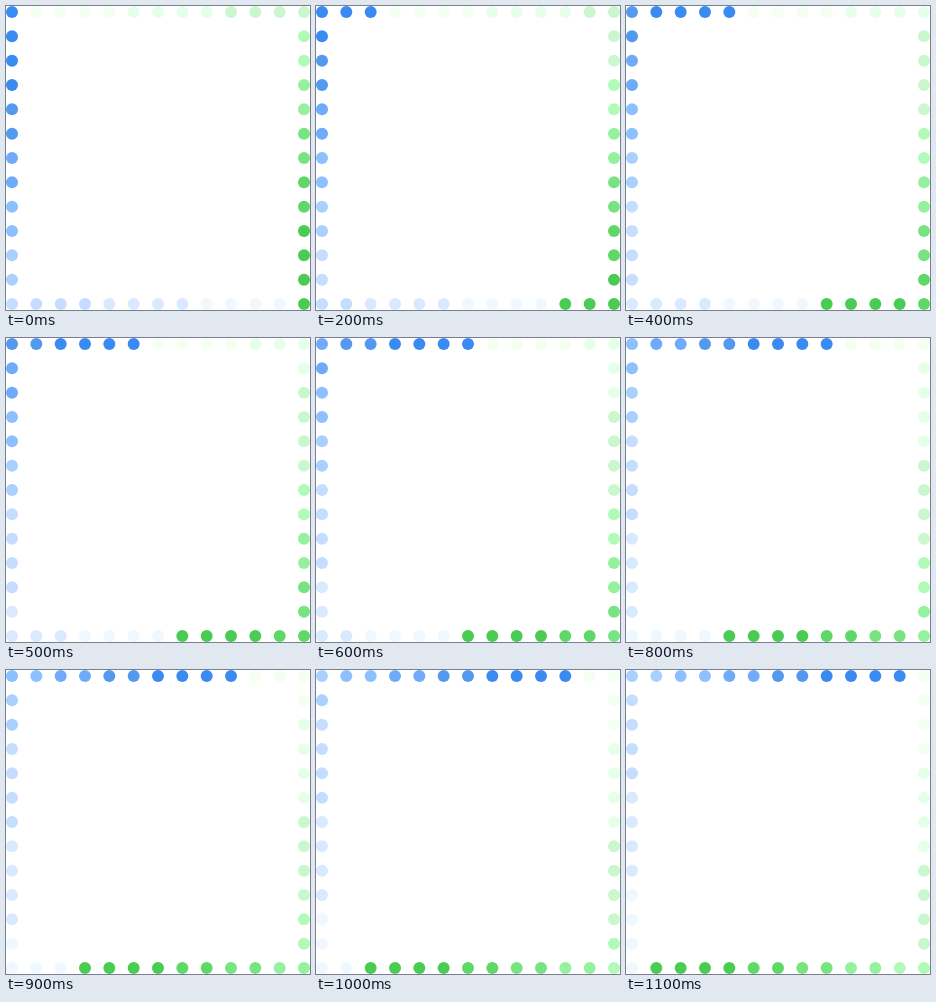
An HTML page that plays this animation: 304x304 px, repeating every 1200 ms.

```html
<!DOCTYPE html>
<html lang="en">
<head>
<meta charset="utf-8">
<title>Dotted border chase</title>
<style>
  html, body { margin: 0; width: 100%; height: 100%; overflow: hidden; background: #fff; }
  svg { display: block; width: 304px; height: 304px; }
</style>
</head>
<body>
<svg viewBox="0 0 304 304"></svg>
<script>
const SIDE = 12, HALF = SIDE * 2, GAP = 292 / SIDE, STEP = 100;

// Shades from head to tail
const BLUE = ['#398bf2', '#5399f0', '#6fabfa', '#8dc0ff', '#a9d0ff', '#c5ddff', '#d9e9ff', '#eff7ff'];
const GREEN = ['#4acb53', '#5fd868', '#77e481', '#95f19d', '#b2fab7', '#caf7cd', '#e6ffe8', '#f4fff2'];

// Four dots of the first shade, then pairs, then groups of four
function shadeIndex(d) {
  if (d < 4) return 0;
  return d < 12 ? Math.floor(d / 2) - 1 : Math.floor(d / 4) + 2;
}

// Counter-clockwise from the top left corner
function place(i) {
  const k = (i % SIDE) * GAP;
  return [[0, k], [k, 292], [292, 292 - k], [292 - k, 0]][Math.floor(i / SIDE)];
}

const svg = document.querySelector('svg');
const dots = Array.from({ length: HALF * 2 }, (_, i) => {
  const dot = document.createElementNS('http://www.w3.org/2000/svg', 'circle');
  const [x, y] = place(i);
  dot.setAttribute('cx', 6 + x);
  dot.setAttribute('cy', 6 + y);
  dot.setAttribute('r', 6);
  return svg.appendChild(dot);
});

let shown = -1;

function draw(now) {
  const step = Math.floor(now / STEP) % SIDE;
  if (step !== shown) {
    shown = step;
    dots.forEach((dot, i) => {
      const d = (i + step) % (HALF * 2);
      const shades = d < HALF ? BLUE : GREEN;
      dot.setAttribute('fill', shades[shadeIndex(d % HALF)]);
    });
  }
  requestAnimationFrame(draw);
}

draw(0);
</script>
</body>
</html>
```
